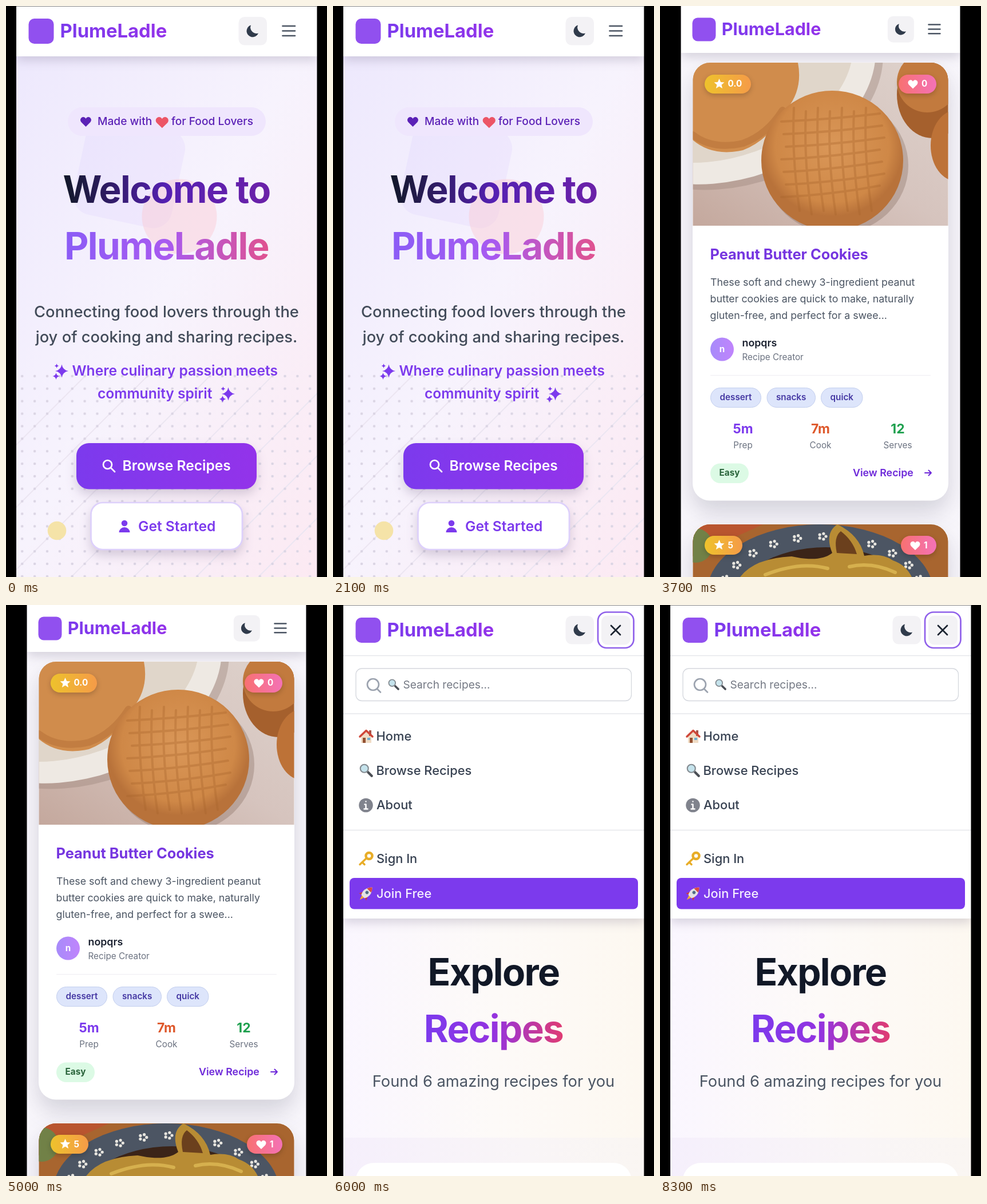
An HTML page for the animation above (9 s loop, 561 by 998 pixels).

```html
<!DOCTYPE html>
<html lang="en">
<head>
<meta charset="utf-8">
<title>Recipe app screens</title>
<style>
html, body { margin: 0; width: 100%; height: 100%; overflow: hidden; background: #000; }
svg { display: block; width: 561px; height: 998px; font-family: Inter, Roboto, sans-serif; font-weight: 400; }
.mid { text-anchor: middle; }
.w5 { font-weight: 500; }
.w6 { font-weight: 600; }
.w7 { font-weight: 700; }
.hero { font-size: 65.6px; font-weight: 700; letter-spacing: -.025em; text-anchor: middle; }
.lead { font-size: 27.34px; text-anchor: middle; }
.cta { font-size: 24.6px; font-weight: 600; }
.menu { font-size: 21.87px; font-weight: 500; fill: #374151; }
.body { font-size: 17.8px; fill: #4b5563; }
.small { font-size: 15.25px; }
.num { font-size: 22.9px; font-weight: 700; text-anchor: middle; }
.line { fill: none; stroke-linecap: round; stroke-linejoin: round; }
.barShadow { filter: drop-shadow(0 7px 9px #3b305530); }
.shadow { filter: drop-shadow(0 9px 9px #38265530); }
.cardShadow { filter: drop-shadow(0 20px 20px #30304830); }
.pillShadow { filter: drop-shadow(0 3px 4px #0003); }
</style>
</head>
<body>
<svg viewBox="0 0 561 998">
<defs>
  <linearGradient id="page" x2="1" y2="1"><stop stop-color="#ece7fd"/><stop offset=".5" stop-color="#f7f3fd"/><stop offset="1" stop-color="#fce9f2"/></linearGradient>
  <linearGradient id="cream"><stop stop-color="#faf6ff"/><stop offset=".5" stop-color="#fdfaf8"/><stop offset="1" stop-color="#fdf8f0"/></linearGradient>
  <linearGradient id="cream2"><stop stop-color="#f5effc"/><stop offset=".6" stop-color="#f9f5f7"/><stop offset="1" stop-color="#faf6f2"/></linearGradient>
  <linearGradient id="violet"><stop stop-color="#7c3aed"/><stop offset="1" stop-color="#9333ea"/></linearGradient>
  <linearGradient id="night"><stop stop-color="#111827"/><stop offset=".5" stop-color="#5520b2"/><stop offset="1" stop-color="#6b21a8"/></linearGradient>
  <linearGradient id="candy"><stop stop-color="#8b5cf6"/><stop offset=".5" stop-color="#a85af0"/><stop offset="1" stop-color="#e0528f"/></linearGradient>
  <linearGradient id="berry"><stop stop-color="#7c3aed"/><stop offset=".5" stop-color="#9333e0"/><stop offset="1" stop-color="#e03c72"/></linearGradient>
  <linearGradient id="gold"><stop stop-color="#eec22c"/><stop offset="1" stop-color="#f59b48"/></linearGradient>
  <linearGradient id="rose"><stop stop-color="#f87171"/><stop offset="1" stop-color="#f472b6"/></linearGradient>
  <linearGradient id="lilac"><stop stop-color="#a78bfa"/><stop offset="1" stop-color="#c084fc"/></linearGradient>
  <linearGradient id="table" x1="1" x2="0" y2="1"><stop stop-color="#ded2cc"/><stop offset=".5" stop-color="#d6c4be"/><stop offset="1" stop-color="#c4a89d"/></linearGradient>
  <radialGradient id="cookie" cy=".4"><stop stop-color="#da9758"/><stop offset=".8" stop-color="#cf8847"/><stop offset="1" stop-color="#b8723a"/></radialGradient>
  <pattern id="dots" x="17.3" y="636" width="21.87" height="21.87" patternUnits="userSpaceOnUse"><circle cx="10.93" cy="10.93" r="2.3" fill="#dbd5e4"/></pattern>
  <clipPath id="photo"><path d="M57.500 384V129a30 30 0 0 1 30-30h386a30 30 0 0 1 30 30V384z"/></clipPath>
  <clipPath id="photo2"><rect x="57.500" y="906" width="446" height="285" rx="30"/></clipPath>

  <path id="heart" d="M0 9L-8 1C-13-5-4-12 0-5C4-12 13-5 8 1Z"/>
  <path id="star" d="M0-9L2.600-3L9-2.600L4 1.700L5.600 8L0 4.600L-5.600 8L-4 1.700L-9-2.600L-2.600-3Z"/>
  <path id="spark" d="M0-10Q1.500-1.500 10 0Q1.500 1.500 0 10Q-1.500 1.500-10 0Q-1.500-1.500 0-10"/>
  <g id="sparks" fill="#7c3aed">
    <use href="#spark" transform="translate(3 0) scale(1.15)"/>
    <use href="#spark" transform="translate(-7 9) scale(.6)"/>
    <use href="#spark" transform="translate(-6 -9) scale(.4)"/>
  </g>
  <g id="lens">
    <path class="line" stroke="#4b4f55" stroke-width="4" d="M3 3L9 9"/>
    <circle cx="-3" cy="-3" r="6.500" fill="#c5e3ec" stroke="#858c92" stroke-width="2"/>
  </g>
  <g id="bar">
    <rect x="39.500" y="22" width="44" height="44" rx="10" fill="#9150ef"/>
    <text x="94.500" y="55" font-size="32.8" class="w7" fill="url(#violet)">PlumeLadle</text>
    <rect x="406.500" y="19" width="49.500" height="49.500" rx="10.500" fill="#f3f2f5"/>
    <path fill="#303b4b" d="M428 33.500A10.600 10.600 0 1 0 441 47.500A10.600 10.600 0 0 1 428 33.500"/>
  </g>
  <path id="burger" class="line" stroke="#4b5563" stroke-width="2.7" d="M483.500 35h21.500M483.500 43.500h21.500M483.500 52h21.500"/>
</defs>

<g class="scene">
  <rect width="561" height="998" fill="url(#page)"/>
  <rect x="128" y="203" width="175" height="175" rx="33" fill="#c9b5fb" opacity=".15" transform="rotate(12 215 290)"/>
  <circle cx="303" cy="368" r="65.500" fill="#fbc5d0" opacity=".42"/>
  <path id="stripes" fill="none" stroke="#ece6f2" stroke-width="2"/>
  <rect y="642" width="561" height="356" fill="url(#dots)"/>
  <circle cx="89" cy="917" r="16.300" fill="#f5e3a8"/>
  <rect x="18" width="526" height="88" fill="#fff" class="barShadow"/>
  <use href="#bar"/><use href="#burger"/>

  <rect x="108" y="177" width="346" height="50" rx="25" fill="#efe6fd"/>
  <use href="#heart" x="139.500" y="202" fill="#5b21b6"/>
  <g font-size="19.14" class="w5" fill="#5b21b6">
    <text x="160" y="208">Made with</text><text x="289" y="208">for Food Lovers</text>
  </g>
  <use href="#heart" transform="translate(272.800 203) scale(1.17 1.15)" fill="#ec5566"/>

  <text class="hero" x="280.500" y="344" fill="url(#night)">Welcome to</text>
  <text class="hero" x="280.500" y="443" fill="url(#candy)">PlumeLadle</text>
  <g class="lead w5" fill="#424b59">
    <text x="280.500" y="544">Connecting food lovers through the</text>
    <text x="280.500" y="588">joy of cooking and sharing recipes.</text>
  </g>
  <g class="cta" fill="#7c3aed">
    <text x="115.500" y="646">Where culinary passion meets</text>
    <text x="160" y="686">community spirit</text>
  </g>
  <use href="#sparks" x="94.500" y="638"/><use href="#sparks" x="385.500" y="678"/>

  <rect x="123" y="764" width="315" height="80.500" rx="21.900" fill="url(#violet)" class="shadow"/>
  <path class="line" stroke="#fff" stroke-width="2.7" d="M183 807L190 814"/>
  <circle cx="177.500" cy="801.500" r="7.500" fill="none" stroke="#fff" stroke-width="2.7"/>
  <text class="cta" x="203.500" y="812" fill="#fff">Browse Recipes</text>
  <rect x="148.500" y="868" width="264.500" height="82" rx="20.500" fill="#fff" stroke="#ddd0fb" stroke-width="2.7" class="shadow"/>
  <g fill="#7c3aed"><circle cx="207" cy="904" r="5.300"/><path d="M197.500 920a9.500 9 0 0 1 19 0z"/>
    <text class="cta" x="231" y="917.500">Get Started</text></g>
  <path d="M0 0h18V998H0zM543.500 0H561V998H543.500z"/>
  <rect x="18" width="525.500" height="1" fill="#888"/>
</g>

<g class="scene" visibility="hidden">
  <rect width="561" height="998" fill="#f9f7fc"/>
  <rect x="57" y="98.500" width="447" height="766" rx="30" fill="#fff" class="cardShadow"/>
  <rect x="57" y="905.500" width="447" height="766" rx="30" fill="#fff" class="cardShadow"/>
  <rect x="37" width="487.500" height="82" fill="#fff" class="barShadow"/>
  <g transform="translate(19.800 0) scale(.93)"><use href="#bar"/><use href="#burger"/></g>

  <g clip-path="url(#photo)">
    <rect x="57" y="99" width="447" height="285" fill="url(#table)"/>
    <ellipse cx="140" cy="134" rx="258" ry="176" fill="#9b857a" opacity=".4" transform="rotate(-20 140 134)"/>
    <ellipse cx="130" cy="128" rx="255" ry="172" fill="#eee9e3" transform="rotate(-20 130 128)"/>
    <ellipse cx="120" cy="120" rx="225" ry="142" fill="#e0d6ca" transform="rotate(-20 120 120)"/>
    <path d="M57 99H241Q250 145 222 180Q190 235 145 252Q92 264 57 234Z" fill="#d08c4c"/>
    <path d="M57 225Q92 252 145 240Q187 225 214 182" class="line" stroke="#b06a33" stroke-width="12" opacity=".45"/>
    <ellipse cx="476" cy="155" rx="62" ry="76" fill="#a5602d"/>
    <ellipse cx="467" cy="133" rx="53" ry="53" fill="#c27a3e"/>
    <ellipse cx="518" cy="244" rx="45" ry="62" fill="#bd7237"/>
    <ellipse cx="308" cy="279" rx="126" ry="119" fill="#785c4f" opacity=".3"/>
    <ellipse cx="301" cy="270" rx="124" ry="122" fill="url(#cookie)"/>
    <g id="marks" class="line" stroke="#a9652c" stroke-width="4" opacity=".35"></g>
  </g>
  <g clip-path="url(#photo2)">
    <rect x="57" y="906" width="447" height="95" fill="#a8652f"/>
    <path d="M57 906H180L57 962Z" fill="#b9552f"/><circle cx="62" cy="943" r="30" fill="#718147"/>
    <ellipse cx="280" cy="1026" rx="198" ry="120" fill="#4c5563"/>
    <ellipse cx="290" cy="1050" rx="166" ry="104" fill="#3b2418"/>
    <g id="flowers" fill="#e7e5df"></g>
    <path d="M140 998Q165 965 230 962Q280 973 301 956Q287 921 310 906Q349 925 357 961Q388 956 407 969Q430 977 440 998Z" fill="#b88c34"/>
    <path d="M309 956Q303 928 316 918Q337 934 344 958Z" fill="#6b401d"/>
    <path d="M184 994Q245 970 293 983M331 980Q370 971 411 990" class="line" stroke="#d6b04e" stroke-width="6"/>
  </g>
  <g class="pillShadow">
    <rect x="78" y="120" width="81" height="33" rx="16.500" fill="url(#gold)"/>
    <rect x="417" y="120" width="66" height="33" rx="16.500" fill="url(#rose)"/>
    <rect x="78" y="926" width="66" height="33" rx="16.500" fill="url(#gold)"/>
    <rect x="421" y="926" width="62" height="33" rx="16.500" fill="url(#rose)"/>
  </g>
  <g class="small w7" fill="#fff">
    <use href="#star" x="103.500" y="136"/><text x="118.500" y="141">0.0</text>
    <use href="#heart" transform="translate(442 136.500) scale(.9)"/><text x="457" y="141">0</text>
    <use href="#star" x="103.500" y="942"/><text x="118.500" y="948">5</text>
    <use href="#heart" transform="translate(446 943) scale(.9)"/><text x="461" y="948">1</text>
  </g>

  <text x="87.500" y="443" font-size="25.4" class="w7" fill="#7636e0">Peanut Butter Cookies</text>
  <g class="body">
    <text x="88" y="489">These soft and chewy 3-ingredient peanut</text>
    <text x="87.500" y="518">butter cookies are quick to make, naturally</text>
    <text x="87.500" y="547">gluten-free, and perfect for a swee...</text>
  </g>
  <circle cx="108.500" cy="600" r="20.500" fill="url(#lilac)"/>
  <text x="108.500" y="605" class="small w7 mid" fill="#fff">n</text>
  <text x="143.500" y="595" font-size="17.8" class="w6" fill="#1b2130">nopqrs</text>
  <text x="143.500" y="619" class="small" fill="#6b7280">Recipe Creator</text>
  <path d="M88 645.500H473" stroke="#efedf2"/>
  <g fill="#dde5fb" stroke="#c3cfee">
    <rect x="88.500" y="667.500" width="88" height="34" rx="17"/><rect x="187" y="667.500" width="84.500" height="34" rx="17"/><rect x="281.500" y="667.500" width="72.500" height="34" rx="17"/>
  </g>
  <g class="small w6 mid" fill="#4538a3"><text x="132.500" y="689">dessert</text><text x="229.200" y="689">snacks</text><text x="317.800" y="689">quick</text></g>
  <g class="num"><text x="145" y="747" fill="#7c3aed">5m</text><text x="280.500" y="747" fill="#de582b">7m</text><text x="415.500" y="747" fill="#1ea04e">12</text></g>
  <g class="small mid" fill="#6b7280"><text x="145" y="772.500">Prep</text><text x="280.500" y="772.500">Cook</text><text x="415.500" y="772.500">Serves</text></g>
  <rect x="88" y="799.500" width="67" height="34.500" rx="17.200" fill="#dcfae5"/>
  <text x="121.500" y="821" class="small w7 mid" fill="#29633a">Easy</text>
  <text x="337" y="822" font-size="17.8" class="w6" fill="#6d28d9">View Recipe</text>
  <path class="line" stroke="#6d28d9" stroke-width="2" d="M463 816h11M469.500 811.500l4.500 4.500l-4.500 4.500"/>
  <path d="M0 0h36.500V998H0zM524.500 0H561V998H524.500z"/>
</g>

<g class="scene" visibility="hidden">
  <rect width="561" height="932" fill="url(#cream)"/>
  <rect y="931" width="561" height="67" fill="url(#cream2)"/>
  <rect x="40" y="975" width="481.500" height="60" rx="32" fill="#fff"/>
  <rect x="18" width="526" height="548" fill="#fff" class="barShadow"/>
  <use href="#bar"/>
  <rect x="469" y="18.500" width="51" height="51" rx="10.500" fill="#f3f2f5"/>
  <rect x="463" y="12.500" width="62.500" height="62.500" rx="15" fill="none" stroke="#9061ea" stroke-width="2.7"/>
  <path class="line" stroke="#1c2431" stroke-width="2.7" d="M486 36l16 16M502 36l-16 16"/>
  <path d="M18 88.500H544M18 190H544M18 393.500H544" stroke="#e5e7eb" stroke-width="1.3"/>
  <rect x="40" y="111" width="481.500" height="56.500" rx="10.500" fill="#fff" stroke="#d5d8de" stroke-width="1.3"/>
  <path class="line" stroke="#9ca3af" stroke-width="2.7" d="M77.500 147L83 152.500"/>
  <circle cx="70" cy="139" r="10" fill="none" stroke="#9ca3af" stroke-width="2.7"/>
  <use href="#lens" transform="translate(106 139) scale(.9)"/>
  <text x="122.500" y="146" font-size="19.14" fill="#747984">Search recipes...</text>

  <g transform="translate(58 229)">
    <path d="M-9 0V12H9V0L0-8Z" fill="#f0dcc5"/><path d="M5-10h4V0H5z" fill="#a6554a"/>
    <path class="line" stroke="#cf4638" stroke-width="3.5" d="M-11 1L0-9.500L11 1"/>
    <path d="M-6 3h5v9h-5z" fill="#945233"/><path d="M2 3h5v4H2z" fill="#6eb0d2"/>
  </g>
  <use href="#lens" transform="translate(58 289) scale(1.08)"/>
  <circle cx="57.500" cy="350" r="12.300" fill="#80838d"/>
  <path class="line" stroke="#fff" stroke-width="2.5" d="M57.500 343.500v.1M55.500 348.500h2v7.500M54.500 356.500h6"/>
  <g class="line" stroke="#e8ad28" stroke-width="3.500">
    <path d="M59 442L47 453.500M51 449.500l4 4"/><circle cx="63" cy="438.500" r="5.500" stroke-width="4.500"/>
  </g>
  <rect x="29" y="477" width="504" height="54.500" rx="8" fill="#7c3aed"/>
  <g transform="translate(58 504) rotate(45)">
    <path d="M-3 7L0 16L3 7Z" fill="#f6a832"/><path d="M-5 0L-9 9L0 6L9 9L5 0Z" fill="#c93d42"/>
    <path d="M0-15Q11-3 4 8H-4Q-11-3 0-15" fill="#e3e2e5"/><path d="M0-15Q4-11 5-7H-5Q-4-11 0-15" fill="#d74b45"/><circle cy="-2" r="2.800" fill="#526d86"/>
  </g>
  <g class="menu">
    <text x="75.500" y="237">Home</text><text x="75.500" y="297">Browse Recipes</text><text x="76" y="357">About</text>
    <text x="76" y="451">Sign In</text><text x="76" y="511.500" fill="#f5efff">Join Free</text>
  </g>
  <text class="hero" x="280.500" y="665" fill="#111827">Explore</text>
  <text class="hero" x="280.500" y="764" fill="url(#berry)">Recipes</text>
  <text class="lead" x="280.500" y="841.500" fill="#4b5563">Found 6 amazing recipes for you</text>
  <path d="M0 0h18V998H0zM543.500 0H561V998H543.500z"/>
  <rect x="18" width="525.500" height="1" fill="#888"/>
</g>
</svg>
<script>
const byId = id => document.getElementById(id);
const repeat = (n, f) => Array.from({ length: n }, (_, i) => f(i)).join('');

// Diagonal stripes over the lower part of the hero
byId('stripes').setAttribute('d', repeat(9, i => {
  const x = 140 + i * 109;
  return `M${x} 645L${x - 353} 998`;
}));

// Fork marks on the cookie, then flowers on the plate rim
byId('marks').innerHTML = repeat(7, i =>
  `<path d="M${234 + i * 21} ${178 + i % 2 * 6}q-4 85 10 180"/><path d="M${212 + i % 3 * 4} ${202 + i * 22}q88-4 172-${14 + i}"/>`);
byId('flowers').innerHTML = repeat(11, i => {
  const a = Math.PI * (1.1 + i * .08);
  const x = 284 + 178 * Math.cos(a), y = 1035 + 108 * Math.sin(a);
  return repeat(5, k => `<circle cx="${x + 6 * Math.cos(k * 1.257)}" cy="${y + 5 * Math.sin(k * 1.257)}" r="2.6"/>`);
});

const scenes = document.querySelectorAll('.scene');
function draw() {
  const current = Math.floor(performance.now() % 9000 / 3000);
  scenes.forEach((s, i) => s.setAttribute('visibility', i === current ? 'visible' : 'hidden'));
  requestAnimationFrame(draw);
}
draw();
</script>
</body>
</html>
```
